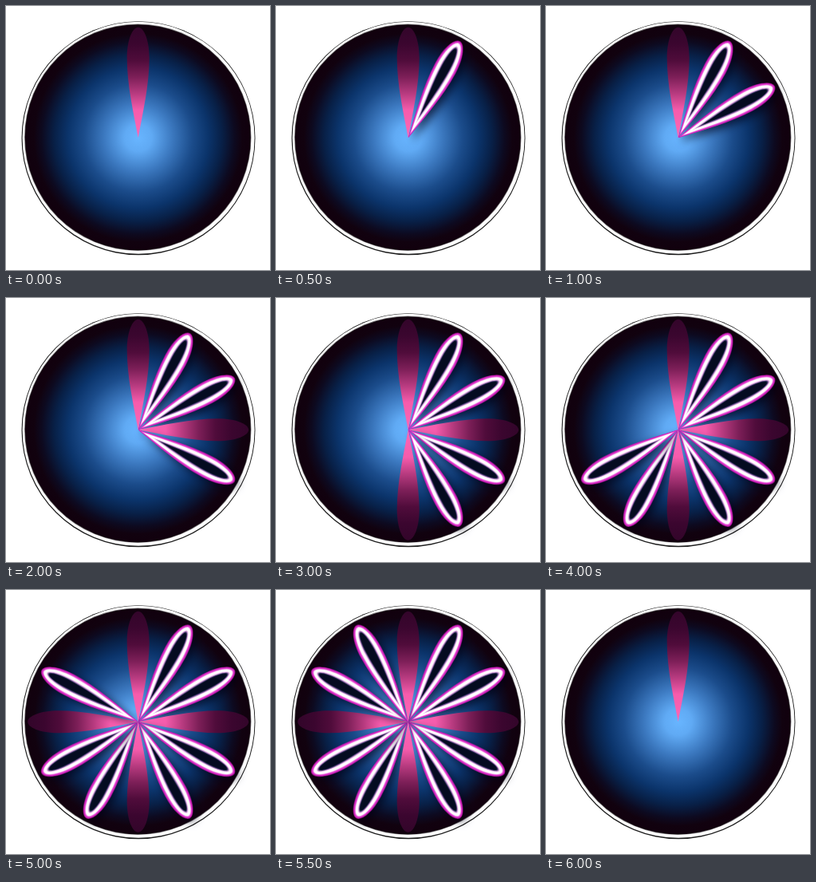
Animation, 331 px wide and 331 px high, one loop 6.5 s. Source, as an HTML page with a canvas:

```html
<!DOCTYPE html>
<html>
<head>
<meta charset="utf-8">
<style>
html, body { margin: 0; width: 100%; height: 100%; overflow: hidden; background: #fff; }
canvas { display: block; width: 331px; height: 331px; }
</style>
</head>
<body>
<canvas id="stage"></canvas>
<script>
const SIZE = 331, STEP = 500, STEPS = 13, PETALS = 12;
const CX = 165.7, CY = 165.2;
const canvas = document.getElementById('stage');
const ratio = window.devicePixelRatio || 1;
canvas.width = canvas.height = Math.round(SIZE * ratio);
const ctx = canvas.getContext('2d');

// Nested leaves, outermost first: [start, end, half width, colour]
const NEON = [
  [0, 137.5, 14.6, 'rgba(190,25,170,0.55)'],
  [0, 136.8, 13.9, '#cc1fb8'],
  [2, 135.6, 12.8, '#dc3fca'],
  [5, 134.6, 11.8, '#f48fe8'],
  [8, 133.6, 10.9, '#ffffff'],
  [20, 130, 7.7, '#f2c8f0'],
  [24, 129, 6.9, '#b98cc4'],
  [28, 128, 6.2, '#5f4a80'],
  [32, 127, 5.5, '#1b1e44'],
  [36, 126, 4.8, '#050b20']
];

function gradient(g, stops) {
  stops.forEach(([at, colour]) => g.addColorStop(at, colour));
  return g;
}

const discFill = gradient(ctx.createRadialGradient(CX, CY, 0, CX, CY, 142), [
  [0, '#68b5ff'], [0.12, '#60aaf4'], [0.3, '#3c79c0'], [0.48, '#1b4c8b'],
  [0.62, '#0b346b'], [0.74, '#082047'], [0.85, '#0d0a20'], [0.92, '#11020f'], [1, '#11000d']
]);
const pinkFill = gradient(ctx.createLinearGradient(0, 0, 0, -138), [
  [0, '#ff66b6'], [0.25, '#f65cac'], [0.4, '#b83b80'], [0.55, '#7d1f58'],
  [0.7, '#500c3b'], [0.85, '#3b062f'], [1, '#33052a']
]);

function circle(x, y, r) {
  ctx.beginPath();
  ctx.arc(x, y, r, 0, Math.PI * 2);
}

function fillCircle(x, y, r, fill) {
  circle(x, y, r);
  ctx.fillStyle = fill;
  ctx.fill();
}

function fillLeaf(start, end, w, fill) {
  const y = f => -(start + (end - start) * f);
  ctx.beginPath();
  ctx.moveTo(0, y(0));
  ctx.bezierCurveTo(w * 0.4, y(0.22), w, y(0.48), w, y(0.72));
  ctx.bezierCurveTo(w, y(0.89), w * 0.5, y(1), 0, y(1));
  ctx.bezierCurveTo(-w * 0.5, y(1), -w, y(0.89), -w, y(0.72));
  ctx.bezierCurveTo(-w, y(0.48), -w * 0.4, y(0.22), 0, y(0));
  ctx.fillStyle = fill;
  ctx.fill();
}

function disc() {
  ctx.fillStyle = '#fff';
  ctx.fillRect(0, 0, SIZE, SIZE);
  fillCircle(166, 165.7, 146.5, '#1c1c1c');
  fillCircle(166.1, 165.3, 145.5, '#fff');
  fillCircle(165.3, 164.7, 142.2, '#777');
  fillCircle(165.3, 164.7, 141.5, discFill);
}

function neonPetal() {
  ctx.save();
  ctx.shadowColor = 'rgba(0,0,18,0.65)';
  ctx.shadowBlur = 11 * ratio;
  ctx.shadowOffsetX = ctx.shadowOffsetY = 4.5 * ratio;
  fillLeaf(0, 136, 13.3, '#cc1fb8');
  ctx.restore();
  NEON.forEach(layer => fillLeaf(...layer));
}

function petal(i) {
  const lean = [0, 28.2, 61.8][i % 3];
  ctx.save();
  ctx.translate(CX, CY);
  ctx.rotate((Math.floor(i / 3) * 90 + lean) * Math.PI / 180);
  if (i % 3) neonPetal();
  else fillLeaf(0, 138.5, 14, pinkFill);
  ctx.restore();
}

// The upright petals lie above their neighbours' shadows.
const isUpright = i => i % 6 === 0;

let shown = -1;
function draw(now) {
  const last = Math.floor(now / STEP) % STEPS % PETALS;
  if (last === shown) return;
  shown = last;
  ctx.setTransform(ratio, 0, 0, ratio, 0, 0);
  disc();
  const visible = Array.from({ length: last + 1 }, (_, i) => i);
  visible.filter(i => !isUpright(i)).forEach(petal);
  visible.filter(isUpright).forEach(petal);
}

const began = performance.now();
function tick() {
  draw(performance.now() - began);
  requestAnimationFrame(tick);
}
tick();
</script>
</body>
</html>
```
